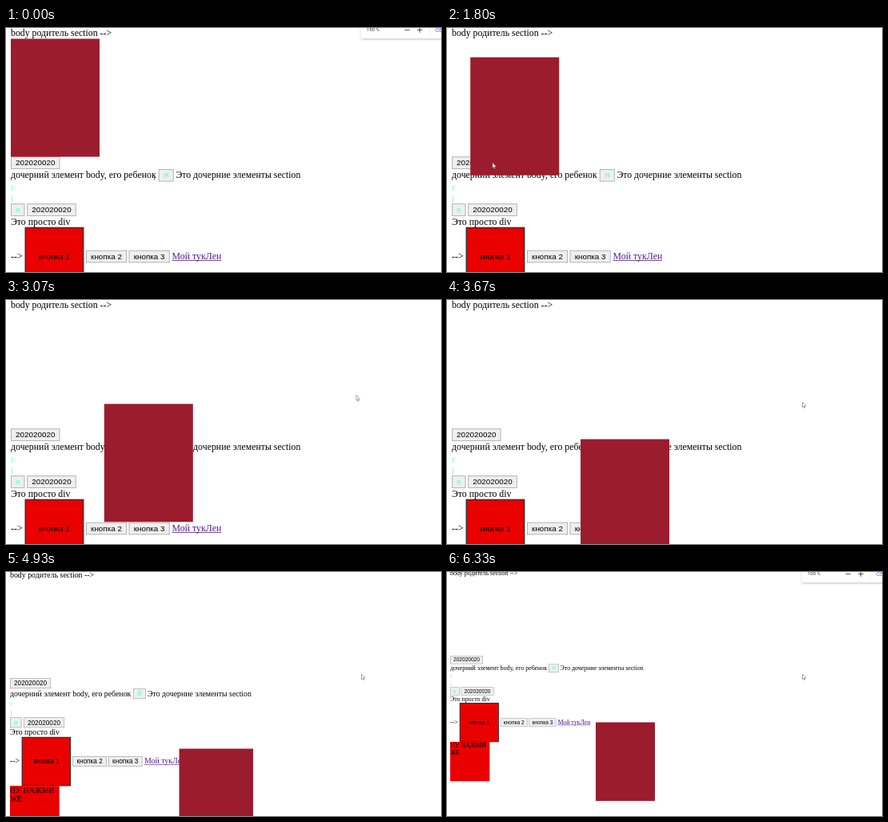
These frames come from a looping animation (544x306 px, 6670 ms). An HTML page with a canvas:

```html
<!DOCTYPE html>
<html lang="ru">
<head>
<meta charset="utf-8">
<style>
html, body { margin: 0; width: 100%; height: 100%; overflow: hidden; background: #fff; }
canvas { display: block; width: 544px; height: 306px; }
</style>
</head>
<body>
<canvas id="stage" width="544" height="306"></canvas>
<script>
const ctx = document.getElementById('stage').getContext('2d');
const LOOP = 6670;
const CROP = 7.5; // part of the page top hidden above the stage
const SERIF = '11.84px "Liberation Serif", "Times New Roman", serif';
const SANS = '9.87px "Liberation Sans", Arial, sans-serif';
const UI = '"Roboto", sans-serif';
const AQUA = '#7fffd4';

// Cursor stops: time, x, y
const cursorPath = [
  [0, 184, 184], [70, 184, 184], [560, 57, 169], [2130, 57, 169],
  [2330, 182.5, 152], [2930, 436, 119], [3070, 438, 119.5], [3400, 444.5, 128]
];

function rect(x, y, w, h, color) {
  ctx.fillStyle = color;
  ctx.fillRect(x, y, w, h);
}

function text(str, x, y, font = SERIF, color = '#000', align = 'left') {
  ctx.font = font;
  ctx.fillStyle = color;
  ctx.textAlign = align;
  ctx.fillText(str, x, y);
}

function button(label, x, y, w, color = '#000', font = SANS) {
  const h = 15.5;
  rect(x, y, w, h, '#a4a4a4');
  rect(x + 0.8, y + 0.8, w - 1.6, h - 1.6, '#efefef');
  text(label, x + w / 2, y + 11, font, color, 'center');
}

function drawPage(shift) {
  text('body родитель section -->', 6, 10.4);
  button('202020020', 6, 161.3, 61.4);
  text('дочерний элемент body, его ребенок', 6, 188.2);
  button('Я', 190.8, 177, 18.9, AQUA, 'bold ' + SANS);
  text('Это дочерние элементы section', 212.4, 188.2);
  text('г', 6, 203.5, SERIF, AQUA);
  text('і', 6, 217.5, SERIF, AQUA);
  button('я', 6, 220.3, 17.4, AQUA, 'bold ' + SANS);
  button('202020020', 26.3, 220.3, 61.4);
  text('Это просто div', 6, 246.8);

  text('-->', 6, 290);
  rect(23.5, 249.7, 73.9, 74, '#3a3030');
  rect(25, 251.2, 70.9, 71, '#eb0000');
  text('кнопка 1', 60.4, 289.9, SANS, '#000', 'center');
  button('кнопка 2', 100, 278.8, 51);
  button('кнопка 3', 153.6, 278.8, 51);
  const link = 'Мой тукЛен';
  text(link, 207.6, 290, SERIF, '#551a8b');
  rect(207.6, 291.2, ctx.measureText(link).width, 0.8, '#551a8b');

  rect(6, 323.3, 74, 74, '#eb0000');
  text('НУ НАЖМИ', 6, 334);
  text('ЖЕ', 6, 347.5);

  rect(6 + shift, 13.5 + shift, 111, 148, '#9b1c2c');
}

function drawZoomBubble(percent) {
  ctx.save();
  ctx.shadowColor = 'rgba(0,0,0,.45)';
  ctx.shadowBlur = 3;
  ctx.shadowOffsetY = 0.8;
  rect(443.5, -20, 130, 33.3, '#fff');
  ctx.restore();
  text(percent + ' %', 451, 4.4, '6px ' + UI, '#333');
  rect(498.5, 2.1, 6.2, 0.9, '#444');
  rect(514.3, 2.1, 6.4, 0.9, '#444');
  rect(517.05, -0.6, 0.9, 6.3, '#444');
  rect(529.5, -2, 0.7, 9, '#ddd');
  text('Сб', 537, 4.8, '6.5px ' + UI, '#3b66c4');
}

function cursorAt(t) {
  let i = 0;
  while (i < cursorPath.length - 2 && t > cursorPath[i + 1][0]) i++;
  const [t0, x0, y0] = cursorPath[i], [t1, x1, y1] = cursorPath[i + 1];
  const p = Math.min(1, Math.max(0, (t - t0) / (t1 - t0)));
  return [x0 + (x1 - x0) * p, y0 + (y1 - y0) * p];
}

function drawCursor(t) {
  const [x, y] = cursorAt(t);
  ctx.save();
  ctx.translate(x, y);
  if (t < 70) {
    rect(1, 0, 0.7, 7, '#333');
  } else {
    ctx.beginPath();
    ctx.moveTo(0, 0);
    for (const [px, py] of [[0, 6.6], [1.5, 5.3], [2.5, 7.5], [3.4, 7.1], [2.5, 4.9], [4.4, 4.7]]) ctx.lineTo(px, py);
    ctx.closePath();
    ctx.fillStyle = '#fff';
    ctx.fill();
    ctx.lineWidth = 0.6;
    ctx.strokeStyle = '#666';
    ctx.stroke();
  }
  ctx.restore();
}

function draw(t) {
  const zoom = t < 4900 ? 150 : t < 5400 ? 125 : 100;
  const shift = Math.min(273, Math.max(0, (t - 1486) * 0.0737));
  rect(0, 0, 544, 306, '#fff');
  ctx.save();
  ctx.translate(0, -CROP);
  ctx.scale(zoom / 150, zoom / 150);
  ctx.translate(0, CROP);
  drawPage(shift);
  ctx.restore();
  if (t < 400 || t >= 5000) drawZoomBubble(zoom);
  drawCursor(t);
}

function tick() {
  draw(performance.now() % LOOP);
  requestAnimationFrame(tick);
}
tick();
</script>
</body>
</html>
```
